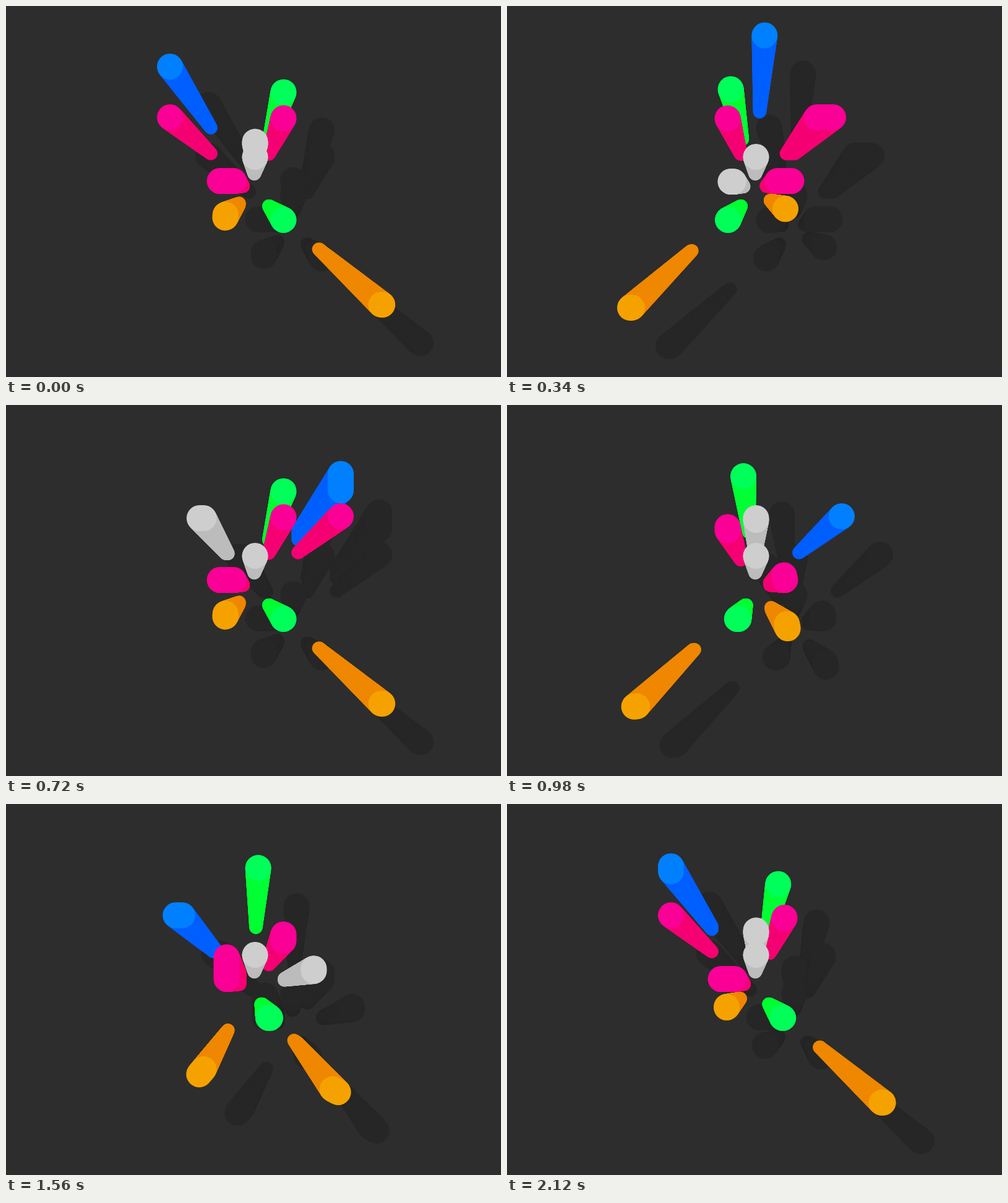
These frames come from a looping animation (800 by 600 pixels, 2140 ms). An HTML page with a canvas:

```html
<!DOCTYPE html>
<html>
<head>
<meta charset="utf-8">
<style>
  html, body { margin: 0; width: 100%; height: 100%; overflow: hidden; background: #2d2d2d; }
  canvas { display: block; }
</style>
</head>
<body>
<canvas width="800" height="600"></canvas>
<script>
const ctx = document.querySelector('canvas').getContext('2d');
const LOOP = 2140, STEP = 20;
const BEAT = 720, ROUND = 3 * BEAT;
const LAYERS = 72, DEPTH = 0.51, RADIUS = 21, SHADOW = 62;
const MID = 402.5;
const LEFT = 265, REACH = 276;   // juggling hand: left end and travel
const HELD = 180, TOSS = 98;     // ball heights in the hand and at release

const blue = ['#005fff', '#0080ff'];
const pink = ['#f50073', '#fa0096'];
const green = ['#00ff33', '#00ff59'];
const orange = ['#ef8700', '#f5a200'];
const white = ['#bcbcbc', '#cecece'];

const clamp = (v, lo, hi) => Math.min(hi, Math.max(lo, v));
const ramp = (t, from, to) => clamp((t - from) / (to - from), 0, 1);
const smooth = (t, from, to) => {
  const u = ramp(t, from, to);
  return u * u * (3 - 2 * u);
};
const wave = t => Math.cos(2 * Math.PI * t / BEAT);

// Every shape is a pair of points: the two ends of a round-capped line
const blur = (path, t, ms) => [path(t - ms / 2), path(t + ms / 2)];
const mirror = points => points.map(([x, y]) => [2 * MID - x, y]);

// Foot swinging back and forth along a quarter ellipse
function foot(t, height) {
  const path = time => {
    const a = Math.PI / 4 * (1 - wave(time));
    return [196 + 159 * Math.cos(a), 328 + height * Math.sin(a)];
  };
  return blur(path, t, 10);
}

// Ball that falls, stretches with its speed and flattens on the ground
function bounce(t) {
  const d = Math.abs(t - BEAT * Math.round(t / BEAT));
  const y = 181.5 + 101.5 * Math.min(1, d / 200) ** 2;
  const tail = 33 * (Math.max(0, Math.min(d, 4 * (292 - d))) / 225) ** 2;
  const flat = clamp((d - 260) / 6, 0, 11);
  return [[448.5 - flat, y - tail], [448.5 + flat, y]];
}

// Top ball crossing an arch: quick off each end, steady into the next
function arch(t) {
  const u = t % BEAT / (BEAT / 2);
  const v = 2 * (u % 1) - 1;
  const side = (u < 1 ? 1 : -1) * (v < 0 ? v * v : -v);
  const dx = 46 * side, x = MID + dx;
  const y = 92.5 + Math.hypot(dx, 9.5);
  return [[x, y], [x, y]];
}

const hip = t => blur(time => [MID + 46 * wave(time), 346], t, 8);

// Square loop to the left, then the same to the right
function orbit(t) {
  const path = time => {
    const q = 4 * time / (ROUND / 2) + 0.38;
    const leg = Math.floor(q) % 4, f = q - Math.floor(q);
    const out = [0, f * f, 1, (1 - f) ** 2][leg];
    const down = [f, 1, 1 - f, 0][leg];
    const side = Math.floor(q / 4) % 2 ? 1 : -1;
    return [MID + side * 95 * out, 183 + 101 * down];
  };
  return blur(path, t + ROUND, 10);
}

const carryBack = t => REACH * smooth(t, 990, 1650);
const handPath = t => [LEFT + REACH * smooth(t, 60, 405) - carryBack(t), HELD];

function ballPath(t) {
  const u = ramp(t, 0, 620);
  const arc = 51 * 4 * u * (1 - u);
  const drop = ramp(t, 620, 770) ** 3 - ramp(t, 1790, 2150);
  return [LEFT + REACH * u - carryBack(t), TOSS - arc + (HELD - TOSS) * drop];
}

const ball = t => blur(ballPath, t, t < 620 ? 0 : 36);
// The hand is covered while the ball rests in it
const hand = t => ballPath(t)[1] > HELD - 20 ? null : blur(handPath, t, 36);

const actors = [
  [green, arch],
  [green, hip],
  [orange, t => foot(t + 50, 160)],
  [orange, t => mirror(foot(t + 378, 155))],
  [pink, hand],
  [blue, ball],
  [pink, t => mirror(bounce(t + 368))],
  [pink, t => bounce(t + 5)],
  [white, orbit],
  [white, () => [[MID, 244], [MID, 244]]]
];

function pill([[x1, y1], [x2, y2]], color) {
  ctx.strokeStyle = color;
  ctx.beginPath();
  ctx.moveTo(x1, y1);
  ctx.lineTo(x2 + 0.01, y2);
  ctx.stroke();
}

// Stacks layers towards the viewer around the vanishing point
function stack(shapes, offset, shade) {
  for (let i = 0; i <= LAYERS; i++) {
    const s = DEPTH + (1 - DEPTH) * i / LAYERS;
    ctx.setTransform(s, 0, 0, s, 400 * (1 - s) + offset, 300 * (1 - s) + offset);
    for (const [[side, top], points] of shapes) {
      pill(points, shade || (i === LAYERS ? top : side));
    }
  }
}

function draw(t) {
  ctx.setTransform(1, 0, 0, 1, 0, 0);
  ctx.fillStyle = '#2d2d2d';
  ctx.fillRect(0, 0, 800, 600);
  ctx.lineCap = 'round';
  ctx.lineWidth = RADIUS * 2;
  const shapes = actors
    .map(([colors, move]) => [colors, move(t)])
    .filter(([, points]) => points);
  stack(shapes, SHADOW, '#262626');
  stack(shapes, 0);
}

const start = performance.now();
function frame() {
  const t = (performance.now() - start) % LOOP;
  draw(Math.floor(t / STEP) * STEP);
  requestAnimationFrame(frame);
}
frame();
</script>
</body>
</html>
```
